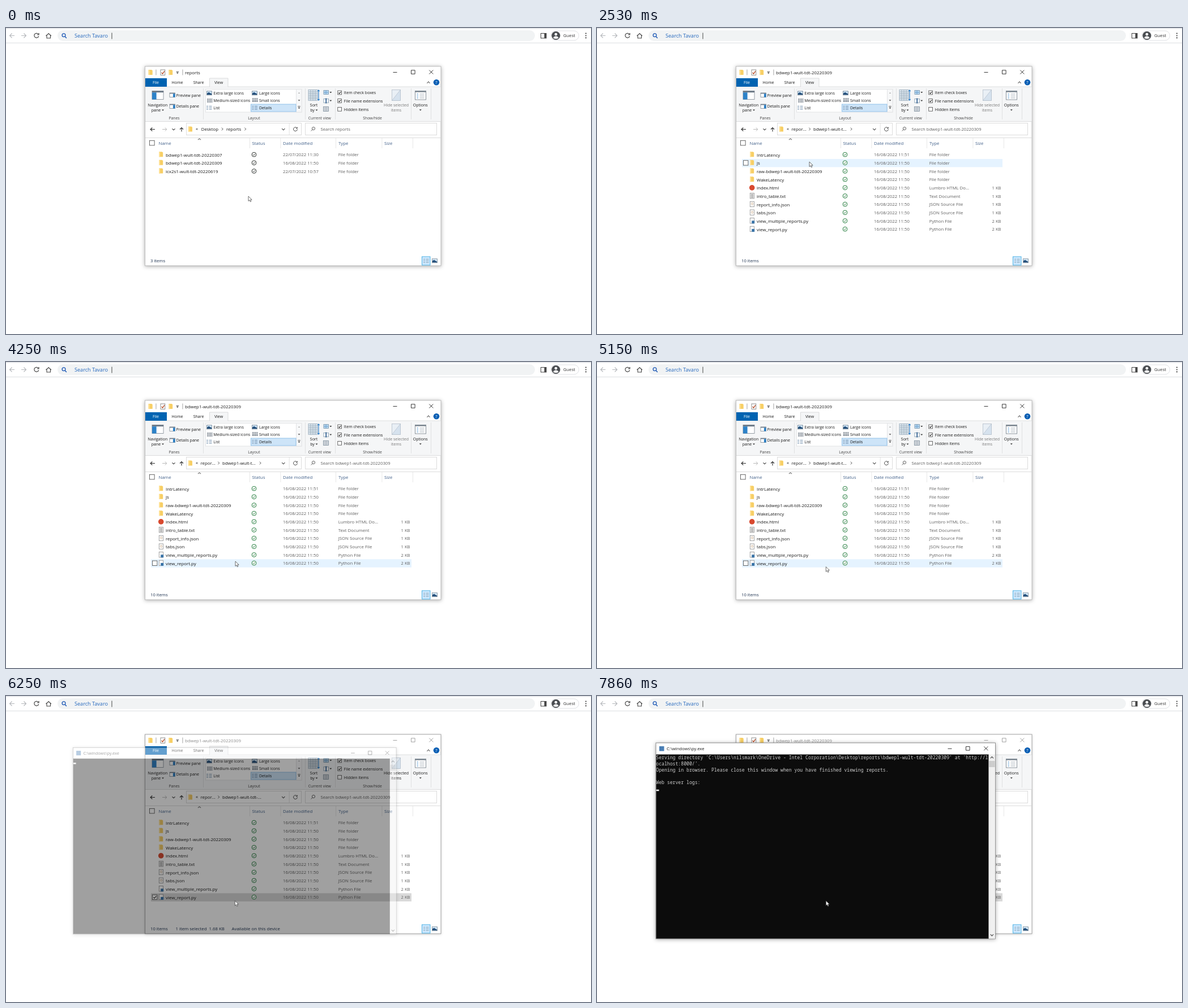
Recreate the animation shown at these times as an HTML page. Size 1033 by 542 pixels, loop 8 s.

```html
<!DOCTYPE html>
<html lang="en">
<head>
<meta charset="utf-8">
<title>Opening a report</title>
<style>
html, body { margin: 0; width: 100%; height: 100%; overflow: hidden; background: #fff; }
svg { display: block; width: 100vw; height: 100vh; font-family: "Open Sans", "Noto Sans", sans-serif; }
.mono { font-family: "Noto Sans Mono", "DejaVu Sans Mono", monospace; white-space: pre; }
.shadow { filter: drop-shadow(0 1.5px 3.5px rgba(0, 0, 0, .33)); }
.faint { filter: drop-shadow(0 1px 2px rgba(0, 0, 0, .16)); }
</style>
</head>
<body>
<svg viewBox="0 0 1033 542"><g id="frame"></g><g id="base"></g><g id="live"></g></svg>
<script>
const LOOP = 8000, ROW0 = 217.3, ROW_H = 14.67;
const INK = '#1a1a1a', GREY = '#606060', BLUE = '#0063b1', NAVY = '#1e3250';

// Drawing helpers; text is placed by its vertical middle
const text = (x, y, s, size = 7.9, fill = INK, anchor = 'start') =>
  `<text x="${x}" y="${y + size * .35}" font-size="${size}" fill="${fill}" text-anchor="${anchor}">${s}</text>`;
const mid = (x, y, s, size = 7, fill = INK) => text(x, y, s, size, fill, 'middle');
const label = (x, y, s) => text(x, y, s, 7);
const rect = (x, y, w, h, fill, stroke = 'none', more = '') =>
  `<rect x="${x}" y="${y}" width="${w}" height="${h}" fill="${fill}" stroke="${stroke}" ${more}/>`;
const line = (d, stroke = INK, w = 1, fill = 'none') =>
  `<path d="${d}" stroke="${stroke}" stroke-width="${w}" fill="${fill}"/>`;
const disc = (x, y, r, fill, stroke = 'none', w = 1) =>
  `<circle cx="${x}" cy="${y}" r="${r}" fill="${fill}" stroke="${stroke}" stroke-width="${w}"/>`;
const group = (s, attrs) => `<g ${attrs}>${s}</g>`;

const chevron = (x, y, dx, dy, c = '#444') => dx
  ? line(`M${x - dx} ${y - 2.4}L${x + dx} ${y}L${x - dx} ${y + 2.4}`, c, .9)
  : line(`M${x - 2.6} ${y - dy}L${x} ${y + dy}L${x + 2.6} ${y - dy}`, c, 1.1);
const drop = (x, y, c = '#333') => line(`M${x - 2} ${y - 1}h4l-2 2.2z`, 'none', 0, c);
const folder = (x, y) =>
  line(`M${x} ${y - 4.5}h5.5l1.7 1.3v7.7h-7.2z`, 'none', 0, '#f7cf66') +
  line(`M${x} ${y - 4.5}l2 1v8.4l-2-.4z`, 'none', 0, '#ffe39a');
const page = (x, y) => rect(x, y - 4.7, 7.2, 9.4, '#fff', '#8d8d8d', 'stroke-width=".8"');
const checkbox = (x, y, size, on) =>
  rect(x, y - size / 2, size, size, '#fff', '#444', 'stroke-width=".8"') +
  (on ? line(`M${x + size * .2} ${y}l${size * .22} ${size * .24}l${size * .4} ${-size * .46}`, INK, 1.1) : '');
const magnifier = (x, y, c, w) => disc(x, y, 2.6, 'none', c, w) + line(`M${x - 1.8} ${y + 1.9}l-2.6 2.6`, c, w);
const winButtons = (x, y, c) =>
  line(`M${x - 3.5} ${y + .5}h7M${x + 28.5} ${y - 3.2}h6.6v6.6h-6.6zM${x + 60.3} ${y - 3.4}l7 7m0-7l-7 7`, c, .9);
const lines = (x, y, n, w, gap, c) =>
  Array.from({ length: n }, (_, i) => line(`M${x} ${y + i * gap}h${w}`, c, .9)).join('');
const dots = (x, y, cols, rows, gap, c) => {
  let d = '';
  for (let j = 0; j < rows; j++) for (let i = 0; i < cols; i++) d += `M${x + i * gap} ${y + j * gap}h1.7`;
  return line(d, c, 1.7);
};

function browser() {
  return rect(0, 0, 1033, 1.5, '#e4e6e9') + rect(0, 26, 1033, 1, '#dcdee1') +
    rect(91, 4, 843, 19, '#f1f3f4', 'none', 'rx="9.5"') +
    line('M15 13.5H6.5m4-4l-4 4 4 4M27 13.5h8.5m-4-4l4 4-4 4', '#b4b7bb', 1.1) +
    line('M57 10.8a4 4 0 1 0 .7 3.7M58 9v3h-3', '#444', 1.2) +
    line('M70.5 14l4.7-4.2 4.7 4.2M72 13.3v4.7h6.4v-4.7', '#444', 1.1) +
    line('M104.3 15.3l2.5 2.7', '#1b57b5', 1.4) + disc(102, 12.8, 2.9, 'none', '#1b57b5', 1.3) +
    text(121, 13.8, 'Search Tavaro', 9.1, '#2367bd') + rect(186.5, 8.5, .9, 11, '#333') +
    rect(944.5, 9.5, 9.5, 8.5, 'none', '#444') + rect(950.5, 9.5, 3.5, 8.5, '#444') +
    rect(962, 5, 49.5, 17, '#fff', '#dfe1e5', 'rx="8.5"') +
    disc(971, 13.5, 7.6, '#4a4d51') + disc(971, 11.2, 2.4, '#fff') +
    line('M966.3 17.6c1-4 8.4-4 9.4 0c-2 2.3-7.4 2.3-9.4 0z', 'none', 0, '#fff') +
    text(984, 13.7, 'Guest', 7.7, '#333') +
    [9.6, 13.5, 17.4].map(y => disc(1024, y, 1.1, '#444')).join('');
}

function ribbon() {
  const pane = (x, y, w, h, side) => rect(x, y, w, h, '#fff', '#7d8791', 'stroke-width=".8"') +
    rect(x, y, w, h * .18, '#6b7885') + rect(side < 0 ? x : x + w * .62, y + h * .18, w * .38, h * .82, '#2d82c8');
  const thumb = (x, y) => rect(x, y - 3.5, 9, 7, '#cfe6f8', '#6f7d8b', 'stroke-width=".8"') +
    line(`M${x + .5} ${y + 3}v-2.5l3-2 5 2.6v1.9z`, 'none', 0, '#25507c');
  const listing = (x, y, c = '#6283a3') => lines(x, y - 2.8, 3, 3, 2.8, c) + lines(x + 4.5, y - 2.8, 3, 5, 2.8, c);
  const rule = x => rect(x, 107, 1, 55, '#e0e1e2');
  return rect(246, 104, 521.6, 61, '#f5f6f7') + rect(246, 103.6, 521.6, .9, '#dadbdc') + rect(246, 165, 521.6, 1, '#dadbdc') +
    rect(246, 89, 38, 15, BLUE) + mid(264.5, 96.7, 'File', 7, '#fff') + mid(302.5, 96.7, 'Home') + mid(340, 96.7, 'Share') +
    line('M359.5 104.5v-15.5h32.5v15.5', '#dadbdc', 1, '#f5f6f7') + mid(375.5, 96.7, 'View') +
    chevron(746, 96.5, 0, -1.4, '#666') + disc(760, 96.3, 5.3, '#0a5fb4') + mid(760, 96.4, '?', 7.6, '#fff') +
    [348, 528, 581, 715, 750].map(rule).join('') +
    pane(258, 111.5, 20, 15, -1) + mid(267.8, 136.7, 'Navigation') + mid(265, 146, 'pane') + drop(277, 145.5) +
    pane(289, 115, 9.5, 7.5, 1) + label(300.5, 119.3, 'Preview pane') +
    pane(289, 135, 9.5, 7.5, 1) + label(300.5, 139, 'Details pane') +
    mid(297, 159.7, 'Panes', 6.8, '#444') + mid(438, 159.7, 'Layout', 6.8, '#444') +
    mid(553.8, 159.7, 'Current view', 6.8, '#444') + mid(647, 159.7, 'Show/hide', 6.8, '#444') +
    rect(352.5, 108.5, 169.5, 40.5, '#fff', '#e3e4e6') + rect(512.5, 108.5, 9.5, 40.5, '#f7f8f9', '#e3e4e6') +
    rect(432.5, 135, 79.5, 13, '#cde4f8', '#94c3ea') +
    thumb(354.5, 115.3) + dots(355.2, 126, 4, 3, 2.5, '#5a6673') + listing(354, 141.3) +
    thumb(434.5, 115.3) + dots(435, 125, 4, 3, 2.6, '#5a6673') + listing(434.5, 141.3) +
    label(366.3, 115.5, 'Extra large icons') + label(366.3, 128.5, 'Medium-sized icons') + label(366.3, 141.5, 'List') +
    label(447, 115.5, 'Large icons') + label(447, 128.5, 'Small icons') + label(447, 141.5, 'Details') +
    drop(517.5, 128.2, '#555') + line('M515.8 116l1.7-2 1.7 2z', 'none', 0, '#aaa') +
    drop(517.5, 141.7) + line('M515.3 138.8h4.4', '#333', .9) +
    rect(534, 109.5, 16, 19, '#e3ecf3', '#94a7b7', 'stroke-width=".8"') + lines(534, 113, 5, 16, 3.1, '#94a7b7') +
    line('M538 109.5v19M542 109.5v19M546 109.5v19', '#94a7b7', .8) + line('M552 110v18m-1.6-2l1.6 2 1.6-2m-3.2-14l1.6-2 1.6 2', '#1c76c6', 1.1) +
    mid(543.5, 136.7, 'Sort') + mid(541, 146, 'by') + drop(548.5, 145.5) +
    rect(561, 110.5, 8.5, 7, '#b8d8f0', '#7893aa', 'stroke-width=".8"') + line('M565 110.5v7M561 114h8.5', '#5b94c4', .8) + drop(573.3, 114) +
    rect(561, 125.5, 8.5, 7, '#fff', '#7893aa', 'stroke-width=".8"') + line('M565.2 124.5v9', '#1c4f85', 1.6) + drop(573.3, 128.7) +
    rect(560.5, 139.5, 9, 8, '#fff', '#6d7f90', 'stroke-width=".8"') + line('M560.5 142h9M560.5 145h9M563.5 139.5v8M566.5 139.5v8', '#6d7f90', .7) +
    checkbox(585.8, 114.5, 6.8, true) + label(596.8, 114.8, 'Item check boxes') +
    checkbox(585.8, 129, 6.8, true) + label(596.8, 129.3, 'File name extensions') +
    checkbox(585.8, 143.8, 6.8, false) + label(596.8, 144.1, 'Hidden items') +
    rect(681.5, 109.5, 15, 19, '#e9eff5', '#b3bfca', 'stroke-width=".8"') + line('M681.5 128.5l15-19v19z', '#b3bfca', .7, '#d6e2ee') +
    rect(722.5, 111.5, 19, 15.5, '#fff', '#7d8791', 'stroke-width=".9"') + rect(722.5, 111.5, 19, 2.2, '#7d8791') +
    lines(730.5, 117, 3, 8, 3.4, '#9aa5af') + lines(725.5, 117, 3, 2.5, 3.4, '#2d82c8') +
    mid(731.8, 136.7, 'Options') + drop(731.8, 145.3);
}

function explorer() {
  const head = [['Name', 269.5], ['Status', 434.5], ['Date modified', 489], ['Type', 587], ['Size', 668]];
  return folder(251.5, 78.5) + rect(264.5, 73.5, .9, 10, '#999') +
    rect(273, 74, 7.8, 9.5, '#fff', '#777', 'stroke-width=".8"') + line('M274.7 79l1.9 2.2 3.2-4.8', '#b5451f', 1.2) +
    folder(287, 78.5) + drop(302.8, 79.7) + line('M300.6 77.3h4.4', '#333', .8) + rect(311.5, 73.5, .9, 10, '#999') +
    ribbon() +
    line('M263 179.5h-8m3.3-3l-3.3 3 3.3 3', '#333', 1.1) + line('M276 179.5h8m-3.3-3l3.3 3-3.3 3', '#bbb', 1) +
    chevron(296, 179.5, 0, 1.2) + line('M310 183.5v-7m-3 3l3-3 3 3', '#333', 1.1) +
    rect(318.5, 168.5, 203, 21, '#fff', '#dcdcdc') + rect(499.7, 168.5, .9, 21, '#dcdcdc') +
    folder(321.8, 179) + mid(337, 178.5, '«', 8) + chevron(489.8, 179.5, 0, 1.3) +
    line('M513.6 177a3.4 3.4 0 1 0 .8 2.4M514.3 175.5v2.3h-2.3', '#444', 1) +
    rect(528.5, 168.5, 232, 21, '#fff', '#dcdcdc') + magnifier(543, 178, '#555', .9) +
    rect(246, 194, 521.6, .9, '#dadada') + checkbox(253.5, 203.6, 8.6, false) + chevron(341.5, 197, 0, -1, '#777') +
    head.map(([s, x]) => text(x, 204, s, 7.9, '#42618a')).join('') +
    [430, 484.5, 582, 663.5, 718].map(x => rect(x, 195, .9, 18, '#e5e5e5')).join('') +
    rect(734.5, 405, 14.5, 15, '#cce8ff', '#4fb2e3') +
    lines(737, 409.5, 3, 3, 2.9, '#8299a8') + lines(741.5, 409.5, 3, 5, 2.9, '#8299a8') +
    rect(752.5, 408.8, 9, 7, '#d5e9f8', '#7b8893', 'stroke-width=".8"') + line('M753 415.3v-3l3-1.6 5.2 3.2v1.4z', 'none', 0, '#25507c');
}

const windowFrame = active => rect(245.5, 68, 522.5, 353, '#fff', active ? '#b0b0b0' : '#909090',
  `stroke-width=".8" class="${active ? 'shadow' : 'faint'}"`);

// Rows: name, icon, date, type, size
const dir = (name, date) => [name, 'dir', date, 'File folder', ''];
const doc = (name, icon, type, size) => [name, icon, '16/08/2022 11:50', type, size + ' KB'];
const RUN = 'bdwep1-wult-tdt-20220309', D = '16/08/2022 11:50';
const REPORTS = [
  dir('bdwep1-wult-tdt-20220307', '22/07/2022 11:30'), dir(RUN, D), dir('icx2s1-wult-tdt-20220619', '22/07/2022 10:57')
];
const FILES = [
  dir('IntrLatency', '16/08/2022 11:51'), dir('js', D), dir('raw-' + RUN, D), dir('WakeLatency', D),
  doc('index.html', 'web', 'Lumbro HTML Do...', 1), doc('intro_table.txt', 'txt', 'Text Document', 1),
  doc('report_info.json', 'json', 'JSON Source File', 1), doc('tabs.json', 'json', 'JSON Source File', 1),
  doc('view_multiple_reports.py', 'py', 'Python File', 2), doc('view_report.py', 'py', 'Python File', 2)
];
const ICONS = {
  dir: y => folder(270, y - .8),
  web: y => disc(273.7, y - .2, 4.8, '#d8492f'),
  txt: y => page(270.3, y - .5) + lines(271.7, y - 3.2, 4, 4.5, 1.9, '#777'),
  json: y => page(270.3, y - .5) + mid(273.9, y - .8, '{}', 5.2, '#a9743c'),
  py: y => page(270.3, y - .5) + rect(273.2, y - .5, 5, 5, '#3a74a8')
};

function row([name, icon, date, type, size], i, tick, boxState) {
  const y = ROW0 + ROW_H * (i + .5) - .2;
  return (boxState ? checkbox(258.5, y - .2, 8.4, boxState > 1) : '') + ICONS[icon](y) +
    text(282, y + .3, name) + disc(438, y - .3, 3.9, '#fff', tick, .95) +
    line(`M436 ${y - .2}l1.4 1.5 2.6-2.9`, tick, .95) +
    text(489, y + .3, date, 7.75, GREY) + text(586.7, y + .3, type, 7.8, GREY) + text(713.5, y + .3, size, 7.6, GREY, 'end');
}

const MOVES = [
  [30, 420, 428, 298, 375, 237], [3320, 3940, 375, 237, 405, 353],
  [4250, 4610, 405, 353, 405, 379], [4860, 5150, 405, 379, 404.3, 362.7]
];
const clamp = v => Math.max(0, Math.min(1, v));
function pointer(t) {
  const m = MOVES.filter(m => t >= m[0]).pop() || MOVES[0];
  const p = clamp((t - m[0]) / (m[1] - m[0])), e = p * p * (3 - 2 * p);
  return [m[2] + (m[4] - m[2]) * e, m[3] + (m[5] - m[3]) * e];
}

function tooltip() {
  const rows = ['Date created: 16/08/2022 11:50', 'Availability status: Available on this device', 'Size: 14.2 MB',
    `Folders: IntrLatency, js, raw-${RUN}, ...`, 'Files: index.html, intro_table.txt, report_info.json, ...'];
  return rect(375.5, 247, 215.5, 57, '#fff', '#c4c4c4', 'stroke-width=".9"') +
    rows.map((s, i) => text(378, 254 + i * 10.8, s, 7.6, '#575757')).join('');
}

function consoleWindow(t) {
  const p = clamp((t - 6200) / 230), scale = 1 - .1 * (1 - p) ** 3, alpha = 1 - (1 - p) ** 2;
  const out = [];
  if (t >= 7190) out.push(
    `Serving directory 'C:\\Users\\nilsmark\\OneDrive - Intel Corporation\\Desktop\\reports\\${RUN}' at 'http://l`, "ocalhost:8000/'.");
  if (t >= 7230) out.push('Opening in browser. Please close this window when you have finished viewing reports.', '');
  if (t >= 7280) out.push('Web server logs:');
  const caret = t < 6650 || t >= 7190;
  const s = rect(104, 83, 599.5, 347, '#fff', '#777', 'stroke-width=".8" class="shadow"') +
    rect(110, 89, 8.5, 8.5, '#4a7fb5') + text(123, 93.6, 'C:\\windows\\py.exe', 7.7) + winButtons(623, 92.8, '#222') +
    rect(104.4, 103.5, 587.3, 326.2, '#0c0c0c') + rect(691.7, 103.5, 11.4, 326.2, '#f0f0f0') +
    rect(692.3, 115, 10.2, 11, '#cdcdcd') + chevron(697.4, 109, 0, -1.4) + chevron(697.4, 423.5, 0, 1.4) +
    group(out.map((l, i) => text(104.3, 109.2 + i * 10.9, l, 8.155, '#cccccc')).join(''), 'class="mono"') +
    (caret ? rect(104.5, 111.2 + 10.9 * out.length, 5, 2.6, '#f2f2f2') : '');
  return group(s, `opacity="${alpha}" transform="translate(403.7 256.5) scale(${scale}) translate(-403.7 -256.5)"`);
}

function mouse(t, x, y) {
  if (t >= 5870 && t < 5980) return disc(404, 363, 6.3, 'none', '#3c9be0', 2.6);
  const busy = t >= 7730 && t < 7860 ? disc(412, 362.5, 3.1, 'none', '#4aa8ea', 1.6) : '';
  return busy + group(line('M0 0V8.6L2 6.8 3.4 9.8 4.9 9.1 3.5 6.2H6.2Z', '#333', .7, '#fff'), `transform="translate(${x} ${y})"`);
}

function live(t) {
  const [x, y] = pointer(t), inside = t >= 2190, active = t < 6170;
  const items = !inside ? REPORTS : t < 2270 ? [] : FILES;
  const hover = Math.floor((y - ROW0) / ROW_H);
  const selected = t >= 5500 ? 9 : t >= 1980 && !inside ? 1 : -1;
  const tint = active ? '#222' : '#999';
  let s = text(316, 78.8, inside ? RUN : 'reports', 7.85, active ? INK : '#8a8a8a') + winButtons(687, 78, tint);

  const hide = t >= 5870 ? INK : '#787878';
  s += mid(689, 136.7, 'Hide selected', 7, hide) + mid(689, 146, 'items', 7, hide);

  if (inside) {
    const short = t >= 2530 && active;
    s += text(343.5, 179.3, 'repor...', 7.8) + chevron(375.5, 179, 1.2) +
      text(382, 179.3, short ? 'bdwep1-wult-t...' : 'bdwep1-wult-tdt-...', 7.8) + (short ? chevron(449, 179, 1.2) : '');
  } else {
    s += text(344.8, 179.3, 'Desktop', 7.8) + chevron(382, 179, 1.2) + text(389, 179.3, 'reports', 7.7) + chevron(422.5, 179, 1.2);
  }
  s += text(555.5, 179.3, 'Search ' + (inside ? RUN : 'reports'), 7.7, GREY);

  const bar = (i, fill, stroke) => rect(256, ROW0 + ROW_H * i, 460, ROW_H - .2, fill, stroke, 'stroke-width=".7"');
  if (selected >= 0) s += t >= 6200 ? bar(selected, '#d9d9d9') : bar(selected, '#cce8ff', '#a9d8fb');
  else if (hover >= 0 && hover < items.length) s += bar(hover, '#e5f3ff');
  s += items.map((it, i) => row(it, i, inside ? '#1f7a38' : '#262b28',
    i === selected ? 2 : i === hover ? 1 : 0)).join('');

  s += text(255, 412.7, items === FILES ? '10 items' : inside ? '' : '3 items', 7.7, NAVY);
  if (t >= 5580) s += text(299.5, 412.7, '1 item selected&#160; 1.68 KB', 7.8, NAVY) + text(398.5, 412.7, 'Available on this device', 7.9, NAVY);
  else if (t >= 2040 && !inside) s += text(292, 412.7, '1 item selected', 7.8, NAVY);

  if (t >= 1290 && t < 1980) s += group(tooltip(), `opacity="${.2 + .8 * clamp((t - 1290) / 220)}"`);
  if (t >= 6200) s += consoleWindow(t);
  return s + mouse(t, x, y);
}

const layer = id => document.getElementById(id);
layer('base').innerHTML = browser() + explorer();
function draw(t) {
  layer('frame').innerHTML = windowFrame(t < 6170);
  layer('live').innerHTML = live(t);
}
let start;
function frame(now) {
  start ??= now;
  draw((now - start) % LOOP);
  requestAnimationFrame(frame);
}
draw(0);
requestAnimationFrame(frame);
</script>
</body>
</html>
```
